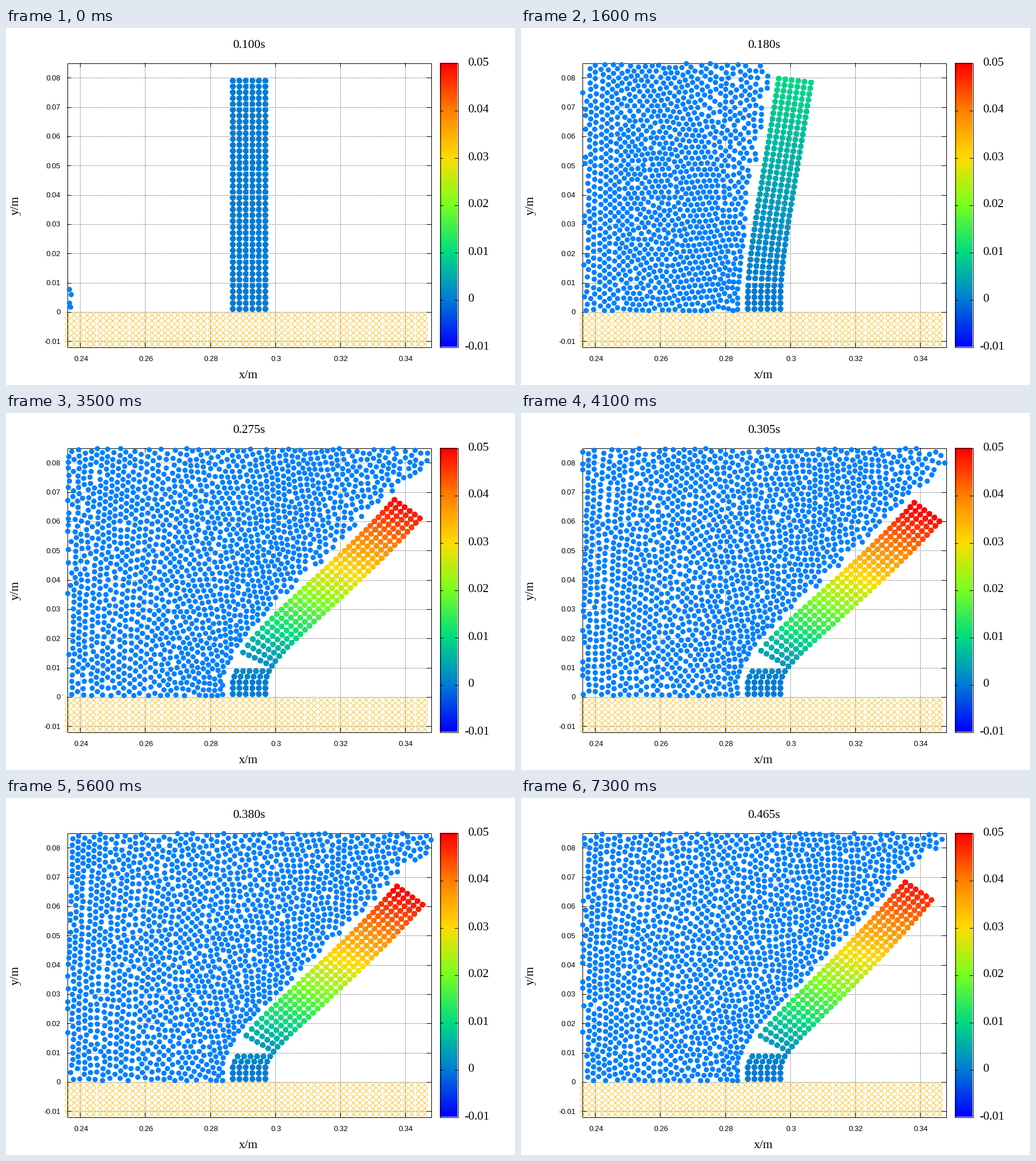
A matplotlib script for the animation above (7400 ms loop, 894x626 px).

```python
import numpy as np
import matplotlib.pyplot as plt
from matplotlib.animation import FuncAnimation
from matplotlib.colors import LinearSegmentedColormap
from matplotlib.patches import Rectangle

W, H, DPI = 894, 626, 100
FRAMES, INTERVAL = 74, 100
L, R, T, B = 107, 746, 61, 559            # plot box in pixels
BAR_L, BAR_R = 762, 793                   # colour bar
X0, X1, Y0, Y1 = 0.236, 0.348, -0.012, 0.085
A = 0.00202                               # particle spacing
GAP = 0.003                               # water to beam
DT = 0.005
DOT = 9.2                                 # dot size in pixels
rng = np.random.default_rng(7)


def time_of(k):
    return 0.1 + DT * k


def px(x):
    return L + 0.5 + (x - X0) * (R - L) / (X1 - X0)


def py(y):
    return T + 0.5 + (Y1 - y) * (B - T) / (Y1 - Y0)


def ramp(t, start, length):
    return np.clip((t - start) / length, 0, 1)


def smooth(u):
    return u * u * (3 - 2 * u)


def logistic(u):
    return 1 / (1 + np.exp(-u))


# ---------- elastic beam ----------
def bend(s, t):
    """Angle from the vertical at arc length s: hinge, straight run, soft tip."""
    swing = ramp(t, 0.14, 0.02) * logistic((t - 0.202) / 0.0158)
    peak = swing * (46 - 25 * max(t - 0.34, 0))
    hinge = 0.0045 + 0.0085 * logistic((0.258 - t) / 0.015)
    rise = 1 - np.exp(-np.clip(s - 0.004, 0, 1) / hinge)
    return np.radians(peak * rise * (1 - 0.15 * (s / 0.079) ** 3))


def beam(t):
    """Six columns by forty rows, hung on the right-hand column."""
    rows = np.arange(40)
    ang = bend(0.002 * rows, t)
    step = np.where(rows > 0, 0.002, 0)
    x = 0.297 + np.cumsum(step * np.sin(ang))
    y = 0.001 + np.cumsum(step * np.cos(ang))
    tilt = np.where(rows < 5, 0, ang)
    off = 0.002 * np.arange(5, -1, -1)[:, None]
    return x - off * np.cos(tilt), y + off * np.sin(tilt), tilt


# ---------- water region ----------
def front(t):
    return min(0.2372 + 1.65 * (t - 0.1), 0.284)


def edge(t):
    """Right limit of the water as a polyline (heights, positions)."""
    bx, by, tilt = beam(t)
    fx = (bx[0] - GAP * np.cos(tilt))[5:]
    fy = (by[0] + GAP * np.sin(tilt))[5:]
    spill = -0.5 + 1.7 * smooth(ramp(t, 0.18, 0.1))
    ys = np.concatenate([[0, 0.008], fy, [0.09]])
    xs = np.concatenate([[0.2838, 0.2838], fx, [fx[-1] + spill * (0.09 - fy[-1])]])
    return ys, np.minimum(xs, front(t)) if t < 0.128 else xs


def surface(x, t):
    """Height of the free surface while the basin fills."""
    f = front(t)
    left = 0.0085 + 1.15 * (t - 0.1)
    right = 0.007 + 0.093 * ramp(t, 0.13, 0.05) ** 2
    level = left + (right - left) * (x - X0) / (f - X0)
    jet = 0.1 * ramp(t, 0.127, 0.038) * np.exp(-np.clip(f - x, 0, 1) / 0.008)
    full = 0.1 * (t > 0.179)
    return np.maximum(np.maximum(level, jet), full)


def confine(p, t, lim):
    y = np.clip(p.imag, 0.0005, np.maximum(surface(p.real, t), 0.001))
    return np.minimum(p.real, np.interp(y, *lim)) + 1j * y


# ---------- water particles ----------
def noise(n):
    return rng.normal(size=n) + 1j * rng.normal(size=n)


def near(p, cut):
    """Index pairs closer than cut, with their offsets."""
    order = np.argsort(p.real)
    x = p.real[order]
    n = np.searchsorted(x, x + cut) - np.arange(len(x)) - 1
    i = np.repeat(np.arange(len(x)), n)
    j = i + 1 + np.arange(n.sum()) - np.repeat(np.cumsum(n) - n, n)
    i, j = order[i], order[j]
    d = p[j] - p[i]
    ok = np.abs(d) < cut
    return i[ok], j[ok], d[ok]


def flow(p, t):
    """A straight rush that turns into flow around a corner."""
    bx, by, _ = beam(t)
    beta = np.angle(bx[0, -1] - GAP - 0.284 + 1j * by[0, -1])
    n = np.pi / (np.pi - beta)
    z = (p - 0.284) * np.exp(-1j * beta)
    speed = 0.45 + 0.75 * np.exp(-(t - 0.13) / 0.1)
    size = speed * np.minimum((np.abs(z) / 0.06) ** (n - 1), 1.5)
    turn = size * np.exp(1j * (beta - (n - 1) * np.angle(z)))
    k = smooth(ramp(t, 0.125, 0.03))
    return (1 - k) * 1.65 + k * turn


def thin(p):
    _, j, _ = near(p, 0.6 * A)
    return np.delete(p, np.unique(j))


def fill(p, t, lim, right=0.351):
    """Add particles from a loose staggered lattice wherever there is room."""
    gx, gy = np.meshgrid(np.arange(0.224, right, 0.9 * A),
                         np.arange(-A, 0.089, A))
    gy[:, ::2] += A / 2
    c = (gx + 1j * gy).ravel() + A * (rng.random() + 1j * rng.random())
    c += 0.12 * A * noise(len(c))
    c = c[np.abs(confine(c, t, lim) - c) < 1e-9]
    both = np.concatenate([p, c])
    i, j, _ = near(both, 0.8 * A)
    i, j = np.minimum(i, j), np.maximum(i, j)
    return np.delete(both, np.unique(j[(i < len(p)) & (j >= len(p))]))


def relax(p):
    i, j, d = near(p, A)
    push = 0.22 * (A / (np.abs(d) + 1e-9) - 1) * d
    np.add.at(p, j, push)
    np.add.at(p, i, -push)
    return p


def visible(p):
    return p[(p.real >= X0 - 1e-5) & (p.real <= X1) & (p.imag <= Y1)]


def simulate():
    p = np.array([0.2367 + 0.0078j, 0.2371 + 0.0060j,
                  0.2367 + 0.0031j, 0.2369 + 0.0018j])
    p = fill(p, 0.1, edge(0.1), right=0.232)
    out = [visible(p)]
    for k in range(1, FRAMES):
        t = time_of(k)
        lim = edge(t)
        p = p + DT * flow(p, t) + 3e-5 * noise(len(p))
        p = p[(p.real > 0.224) & (p.real < 0.351) & (p.imag < 0.089)]
        p = fill(thin(confine(p, t, lim)), t, lim)
        for _ in range(6):
            p = confine(relax(p), t, lim)
        out.append(visible(p))
    return out


water = simulate()

# ---------- static picture ----------
fig = plt.figure(figsize=(W / DPI, H / DPI), dpi=DPI, facecolor="white")
ax = fig.add_axes([0, 0, 1, 1])
ax.axis("off")
PT = 72 / DPI                             # one pixel in points

palette = LinearSegmentedColormap.from_list("heat", [
    "#0000ff", "#007dd4", "#00dc82", "#78ff20", "#ffdc00", "#ff8000", "#ff0000"])


def line(xs, ys, **kw):
    ax.plot(xs, ys, lw=PT, antialiased=False, solid_capstyle="butt",
            **{"color": "black", "zorder": 3, **kw})


def label(x, y, s, size, family="Liberation Serif", **kw):
    return ax.text(x, y, s, fontsize=size * PT, family=family,
                   **{"ha": "center", "va": "baseline", **kw})


def number(k):
    return f"{0.01 * k:.2f}" if k else "0"


def frame_box(x0, x1):
    ax.add_patch(Rectangle((x0 + 0.5, T + 0.5), x1 - x0, B - T, fill=False,
                           lw=PT, ec="black", antialiased=False, zorder=3))


def ticks_x(x, size):
    for y, d in ((B, -size), (T, size)):
        line([x, x], [y, y + d])


def ticks_y(y, x0, x1, size):
    line([x0, x0 + size], [y, y])
    line([x1, x1 - size], [y, y])


dots = dict(color="#8c8c8c", ls=(0, (2, 2)), zorder=1)
for k in range(24, 36, 2):
    x = px(0.01 * k)
    line([x, x], [T, B], **dots)
    ticks_x(x, 7)
    label(x + 1.5, 584, number(k).rstrip("0"), 13, "Liberation Sans")
for k in range(-1, 9):
    y = py(0.01 * k)
    line([L, R], [y, y], **dots)
    ticks_y(y, L, R, 7)
    label(96, y + 4.5, number(k), 13, "Liberation Sans", ha="right")

gx, gy = np.meshgrid(X0 + 0.002 * np.arange(56), -0.001 - 0.002 * np.arange(6))
ax.plot(px(gx.ravel()), py(gy.ravel()), "x", ms=10 * PT, mew=PT,
        color="#ffc020", antialiased=False, zorder=2)
frame_box(L, R)

ax.imshow(np.linspace(1, 0, 256)[:, None], cmap=palette, aspect="auto",
          extent=(BAR_L, BAR_R, B, T), zorder=2)
frame_box(BAR_L, BAR_R)
for k in range(-1, 6):
    y = B + 0.5 - (k + 1) * (B - T) / 6
    ticks_y(y, BAR_L, BAR_R, 5)
    label(811 if k >= 0 else 805, y + 4, number(k), 21.3, ha="left")
ax.set_xlim(0, W)
ax.set_ylim(H, 0)

label(426, 614, "x/m", 21.6)
label(17, 311, "y/m", 21.6, rotation=90, va="center")
title = label(426.5, 35, "", 21.6)

# ---------- moving parts ----------
drops, = ax.plot([], [], "o", ms=DOT * PT, mew=0, color="#0080ff",
                 antialiased=False, zorder=5)
rest_x = beam(0.1)[0].ravel()
rods = ax.scatter(rest_x, rest_x, s=(DOT * PT) ** 2, c=rest_x, cmap=palette,
                  vmin=-0.01, vmax=0.05, linewidths=0, antialiased=False, zorder=6)


def draw(k):
    t = time_of(k)
    title.set_text(f"{t:.3f}s")
    p = water[k]
    drops.set_data(px(p.real), py(p.imag))
    bx, by, _ = beam(t)
    bx, by = bx.ravel(), by.ravel()
    rods.set_offsets(np.column_stack([px(bx), py(by)]))
    rods.set_array(bx - rest_x)
    return drops, rods, title


anim = FuncAnimation(fig, draw, frames=FRAMES, interval=INTERVAL, repeat=True,
                     repeat_delay=0, blit=False)
plt.show()
```
